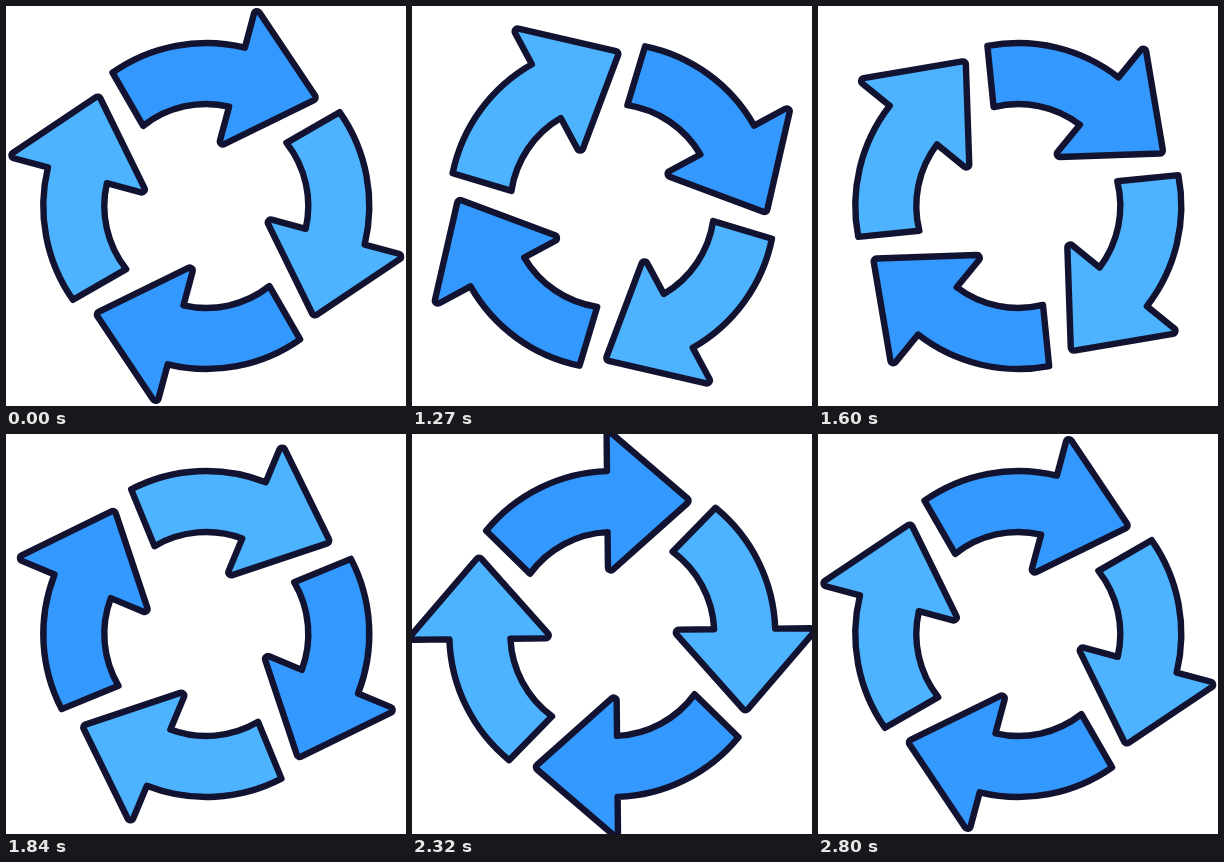
Recreate the animation shown at these times as an HTML page with a canvas. Size 400 by 400 pixels, loop 2.83 s.

```html
<!DOCTYPE html>
<html lang="en">
<head>
<meta charset="utf-8">
<title>Turning arrows</title>
<style>
  html, body { margin: 0; width: 100%; height: 100%; overflow: hidden; background: #fff; }
  canvas { display: block; width: 400px; height: 400px; }
</style>
</head>
<body>
<canvas id="stage"></canvas>
<script>
const LOOP = 2830, HOLD = 1030, STEP = 30, STEPS = 60;
const CENTER = { x: 200.3, y: 200 };
const OUTER = 163, INNER = 102, MID = (OUTER + INNER) / 2;
const TAIL = 14.6;                                  // tail edge's offset from the radius
const BACK = -3.7, TIP = 79.2, HALF = 72.5, ROUND = 3;
const COLORS = ['#3399ff', '#4db3ff'];
const INK = '#121331';

const canvas = document.getElementById('stage');
const ctx = canvas.getContext('2d');
const scale = window.devicePixelRatio || 1;
canvas.width = canvas.height = 400 * scale;

// Arrow pointing right, above the center
function arrowPath() {
  const path = new Path2D();
  const top = -Math.PI / 2;
  const tailAngle = r => top - Math.PI / 4 - Math.asin(TAIL / r);
  const notchAngle = r => top + Math.asin(BACK / r);
  const notchY = r => -Math.sqrt(r * r - BACK * BACK);
  path.arc(0, 0, OUTER, tailAngle(OUTER), notchAngle(OUTER));
  path.arcTo(BACK, -MID - HALF, TIP, -MID, ROUND);
  path.arcTo(TIP, -MID, BACK, -MID + HALF, ROUND);
  path.arcTo(BACK, -MID + HALF, BACK, notchY(INNER), ROUND);
  path.lineTo(BACK, notchY(INNER));
  path.arc(0, 0, INNER, notchAngle(INNER), tailAngle(INNER), true);
  path.closePath();
  return path;
}

const bezier = (s, a, b) => 3 * (1 - s) * (1 - s) * s * a + 3 * (1 - s) * s * s * b + s * s * s;

function ease(p) {
  let lo = 0, hi = 1;
  for (let i = 0; i < 30; i++) {
    const mid = (lo + hi) / 2;
    if (bezier(mid, 0.288, 0.1825) < p) lo = mid; else hi = mid;
  }
  return bezier((lo + hi) / 2, 0, 1);
}

function turnAt(time) {
  if (time < HOLD) return 0;
  const step = Math.min(STEPS, Math.floor((time - HOLD) / STEP) + 1);
  return 360 * ease(step / STEPS);
}

const arrow = arrowPath();

function draw(time) {
  ctx.setTransform(scale, 0, 0, scale, 0, 0);
  ctx.fillStyle = '#fff';
  ctx.fillRect(0, 0, 400, 400);
  ctx.translate(CENTER.x, CENTER.y);
  ctx.rotate((15 + turnAt(time)) * Math.PI / 180);
  ctx.lineWidth = 6.4;
  ctx.lineJoin = 'round';
  ctx.strokeStyle = INK;
  for (let i = 0; i < 4; i++) {
    ctx.fillStyle = COLORS[i % 2];
    ctx.fill(arrow);
    ctx.stroke(arrow);
    ctx.rotate(Math.PI / 2);
  }
}

const start = performance.now();
function tick() {
  draw((performance.now() - start) % LOOP);
  requestAnimationFrame(tick);
}
tick();
</script>
</body>
</html>
```
